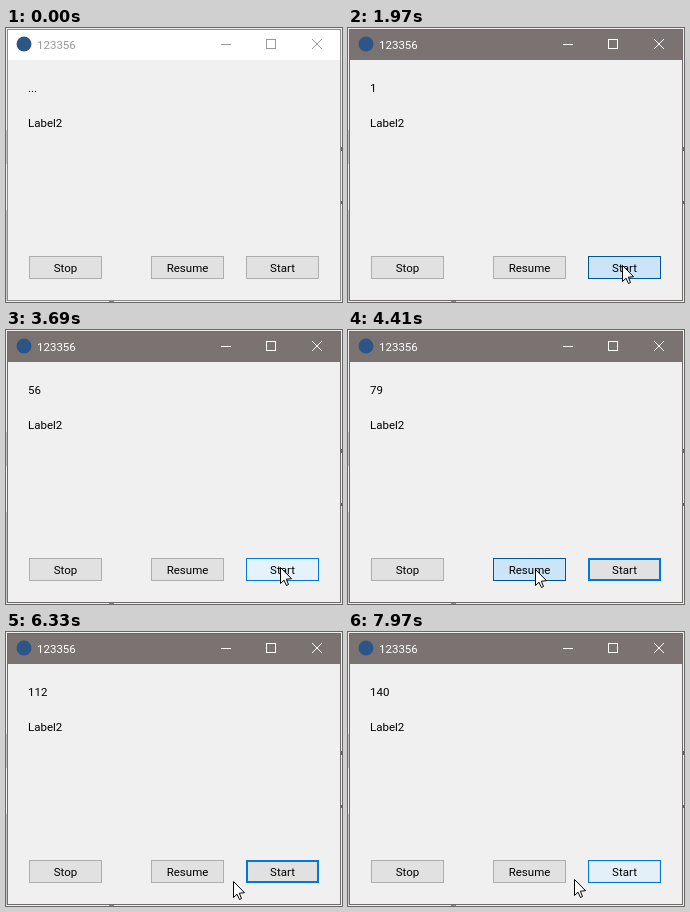
An HTML page with a canvas for the animation above (8 s loop, 336 by 274 pixels).

```html
<!DOCTYPE html>
<html lang="en">
<head>
<meta charset="utf-8">
<title>Counter window</title>
<style>
html, body { margin: 0; width: 100%; height: 100%; overflow: hidden; }
canvas { display: block; }
</style>
</head>
<body>
<canvas id="stage" width="336" height="274"></canvas>
<script>
const ctx = document.getElementById('stage').getContext('2d');
const LOOP = 8000, ENTER = 640, ACTIVATE = 1000;
const PRESS_TIME = 120, RELEASE = 80, COUNT_STEP = 31.25;
const TOP = 228, WIDTH = 73, HEIGHT = 23;
const buttonX = { Stop: 23, Resume: 145, Start: 240 };

// Button looks: outer border, inner ring, fill (RGB each)
const BLUE = [0, 120, 215], GREY = [225, 225, 225], PALE = [229, 241, 251], SKY = [204, 228, 247];
const NORMAL = [173, 173, 173, ...GREY, ...GREY];
const FOCUS = [...BLUE, ...BLUE, ...GREY];
const HOVER = [...BLUE, ...PALE, ...PALE];
const PRESSED = [0, 84, 153, ...SKY, ...SKY];

// Start lets the counter run, Resume halts it
const clicks = [
  { time: 1845, name: 'Start' }, { time: 4360, name: 'Resume' },
  { time: 5253, name: 'Start' }, { time: 6820, name: 'Resume' },
  { time: 7593, name: 'Start' }
];

// Pointer moves: from time, to time, x, y reached
const moves = [
  [0, 1, 330, 262], [660, 1000, 214, 150], [1060, 1600, 274, 237],
  [3700, 4250, 187, 239], [4460, 4800, 234, 252], [4800, 5120, 276, 244],
  [5500, 6150, 221, 262], [6150, 6330, 227, 249], [6400, 6750, 199, 240],
  [6930, 7090, 307, 243], [7800, 7980, 226, 247]
];

function pointerAt(t) {
  let x = 0, y = 0;
  for (const [from, to, toX, toY] of moves) {
    const u = Math.min(1, Math.max(0, (t - from) / (to - from)));
    const ease = u * u * (3 - 2 * u);
    x += (toX - x) * ease;
    y += (toY - y) * ease;
  }
  return [Math.round(x), Math.round(y)];
}

function sample(t) {
  const shown = Math.floor((t - 10) / 40) * 40 + 10;
  return 1890 + 71.66 * Math.floor((shown - 1870.3) / 71.66);
}

function look(name, t) {
  const last = clicks.findLast(c => c.time <= t);
  const focused = last ? last.name : t >= ACTIVATE ? 'Start' : '';
  if (last && last.name === name && t < last.time + PRESS_TIME) return PRESSED;
  const [x, y] = pointerAt(t);
  const left = buttonX[name];
  if (x >= left && x < left + WIDTH && y >= TOP && y < TOP + HEIGHT) return HOVER;
  return focused === name ? FOCUS : NORMAL;
}

// Pressing shows at once; every other change fades as a moving average
function fadedLook(name, t) {
  if (look(name, t) === PRESSED) return PRESSED;
  const steps = 10;
  const sum = NORMAL.map(() => 0);
  for (let i = 0; i < steps; i++) {
    look(name, t - 40 - 20 * i).forEach((v, j) => sum[j] += v);
  }
  return sum.map(v => Math.round(v / steps));
}

function counter(t) {
  if (t < clicks[0].time + RELEASE) return '...';
  const ms = clicks.reduce((sum, { time, name }) =>
    sum + (name === 'Start' ? 1 : -1) * Math.max(0, t - time - RELEASE), 0);
  return String(Math.floor(ms / COUNT_STEP));
}

function box(color, x, y, w, h) {
  ctx.fillStyle = color;
  ctx.fillRect(x, y, w, h);
}

function text(str, x, y, color = '#000', align = 'left') {
  ctx.font = '11.5px Roboto, "Open Sans", sans-serif';
  ctx.textAlign = align;
  ctx.fillStyle = color;
  ctx.fillText(str, x, y);
}

function button(name, t) {
  const x = buttonX[name], c = fadedLook(name, t);
  for (let i = 0; i < 3; i++) {
    box(`rgb(${c.slice(i * 3, i * 3 + 3)})`, x + i, TOP + i, WIDTH - 2 * i, HEIGHT - 2 * i);
  }
  text(name, x + WIDTH / 2, 244, '#000', 'center');
}

function backdrop() {
  box('#f0f0f0', 0, 0, 336, 274);
  box('#c8c8c8', 0, 102, 1, 34);
  box('#c8c8c8', 0, 182, 1, 91);
  box('#666', 335, 119, 1, 4);
  box('#666', 335, 173, 1, 3);
  box('#888', 103, 273, 5, 1);
}

function frame(active) {
  box(active ? '#706a69' : '#8c8c8c', 1, 1, 334, 272);
  box(active ? '#7a7372' : '#fff', 2, 2, 332, 30);
  box('#f0f0f0', 2, 32, 332, 240);
  ctx.fillStyle = '#2c5688';
  ctx.beginPath();
  ctx.arc(18, 16, 7.5, 0, 7);
  ctx.fill();
  const ink = active ? '#fff' : '#999';
  text('123356', 31, 21, ink);
  ctx.strokeStyle = ink;
  ctx.lineWidth = 1;
  box(ink, 215, 16, 10, 1);
  ctx.strokeRect(260.5, 11.5, 9, 9);
  ctx.beginPath();
  ctx.moveTo(306, 11); ctx.lineTo(316, 21);
  ctx.moveTo(316, 11); ctx.lineTo(306, 21);
  ctx.stroke();
}

function pointer(t) {
  if (t < ENTER) return;
  const [x, y] = pointerAt(t);
  const shape = [[0, 0], [0, 16], [3.5, 12.7], [6, 18], [8, 17], [5.8, 11.7], [11, 11.2]];
  ctx.beginPath();
  shape.forEach(([dx, dy]) => ctx.lineTo(x + dx + .5, y + dy + .5));
  ctx.closePath();
  ctx.fillStyle = '#fff';
  ctx.fill();
  ctx.strokeStyle = '#000';
  ctx.stroke();
}

function draw(now) {
  const t = sample(now % LOOP);
  backdrop();
  frame(t >= ACTIVATE);
  text(counter(t), 22, 64);
  text('Label2', 22, 99);
  Object.keys(buttonX).forEach(name => button(name, t));
  pointer(t);
}

let begin;
function tick(now) {
  begin ??= now;
  draw(now - begin);
  requestAnimationFrame(tick);
}
requestAnimationFrame(tick);
</script>
</body>
</html>
```
